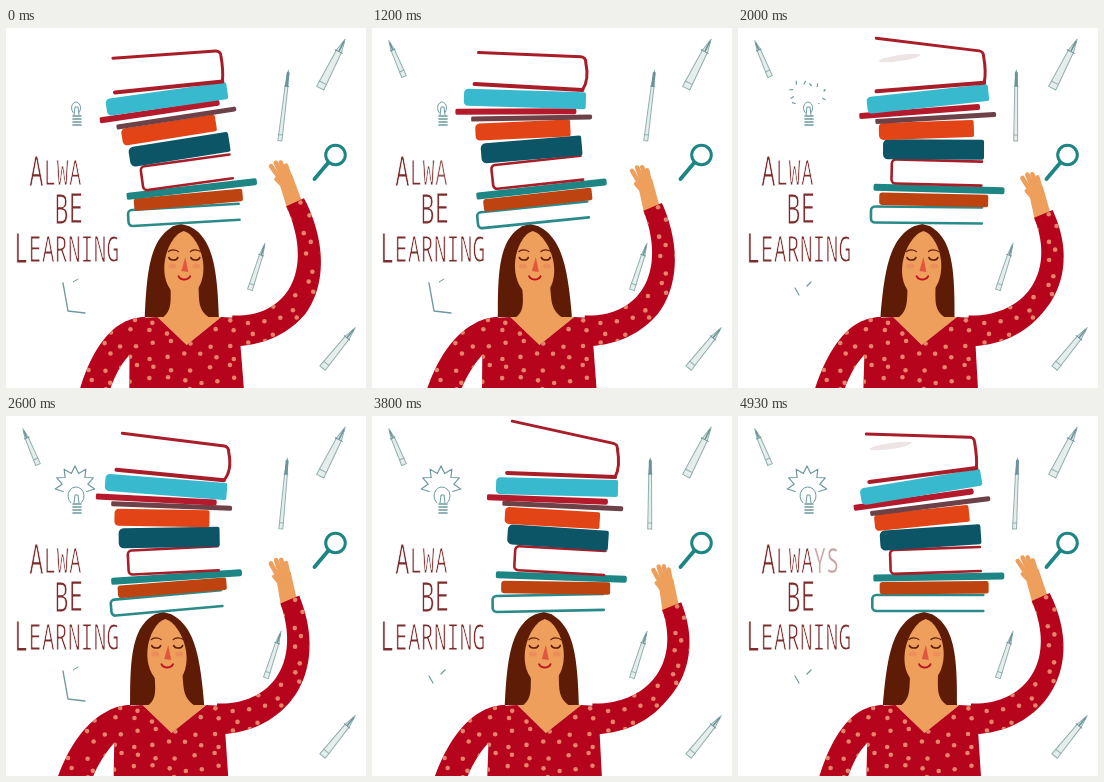
An HTML page with a canvas for the animation above (5000 ms loop, 360x360 px).

```html
<!DOCTYPE html>
<html lang="en">
<head>
<meta charset="utf-8">
<title>Always Be Learning</title>
<style>
  html, body { margin: 0; height: 100%; overflow: hidden; background: #fff; }
  canvas { display: block; width: 100vw; height: 100vh; }
</style>
</head>
<body>
<canvas id="stage" width="360" height="360"></canvas>
<script>
const ctx = document.getElementById('stage').getContext('2d');
const RED = '#b5041c', SKIN = '#ee9f5c', HAIR = '#5e1b06', TEAL = '#1d8583', WINE = '#a91d29', INK = '#6d9a9f';
const { sin, cos, sqrt, tanh, PI } = Math;
const rad = d => d * PI / 180;
const clamp = (v, a = 0, b = 1) => Math.min(b, Math.max(a, v));
let phase, C, S;   // sway phase in degrees, its cosine and sine

const wave = (amp, lag) => amp * cos(rad(phase - lag));
const near = (deg, spread) => cos(rad(phase - deg)) > cos(rad(spread));

// The sway travels upwards: higher parts lag behind the hips.
function sway(y, x = 180) {
  const lag = y < 200 ? 100 - .36 * y : 26 - .08 * (y - 200);
  const amp = clamp(19.5 - (y - 90) * .046, 10.5, 19.5);
  return wave(amp + Math.max(0, (110 - x) * .1), lag);
}
const body = (x, y) => [x + sway(y, x), y];
function arm(x, y) {
  const up = Math.max(0, 285 - y);
  return [x + wave(11 + up * .014, 20 + up * .4), y + clamp(up / 100) * (7 * S - 4 * C)];
}

function poly(color, pts) {
  ctx.beginPath();
  pts.forEach(p => ctx.lineTo(...p));
  ctx.closePath();
  ctx.fillStyle = color;
  ctx.fill();
}

function line(color, width, ...pts) {
  ctx.beginPath();
  pts.forEach(p => ctx.lineTo(...p));
  ctx.strokeStyle = color;
  ctx.lineWidth = width;
  ctx.stroke();
}

function ring(x, y, rx, ry, from = 0, to = 360) {
  ctx.beginPath();
  ctx.ellipse(x, y, rx, ry, 0, rad(from), rad(to));
}

function at(x, y, angle, draw) {
  ctx.save();
  ctx.translate(x, y);
  ctx.rotate(angle);
  draw();
  ctx.restore();
}

const bezier = (a, b, c, d) => t => [0, 1].map(k =>
  (1 - t) ** 3 * a[k] + 3 * t * (1 - t) ** 2 * b[k] + 3 * t * t * (1 - t) * c[k] + t ** 3 * d[k]);
const straight = (a, b) => t => [0, 1].map(k => a[k] + (b[k] - a[k]) * t);

// Solid of varying half width along a centre line
function tube(color, map, centre, half, steps = 40) {
  const left = [], right = [];
  for (let i = 0; i <= steps; i++) {
    const t = i / steps, [x, y] = centre(t);
    const [x0, y0] = centre(t - .001), [x1, y1] = centre(t + .001);
    const k = half(t) / Math.hypot(x1 - x0, y1 - y0);
    const nx = (y0 - y1) * k, ny = (x1 - x0) * k;
    left.push(map(x + nx, y + ny));
    right.unshift(map(x - nx, y - ny));
  }
  poly(color, [...left, ...right]);
}

// Polka dots inside the outline drawn last
function dots(map) {
  ctx.save();
  ctx.clip();
  ctx.fillStyle = '#e5836b';
  for (let j = 0; j < 16; j++)
    for (let i = 0; i < 15; i++) {
      const x = 64 + i * 18 + j % 2 * 9 + 3 * sin(i * 7 + j * 3);
      const y = 184 + j * 12 + 3 * cos(i * 5 + j * 2);
      ring(...map(x, y), 2.3, 2.3);
      ctx.fill();
    }
  ctx.restore();
}

// From the bottom up: colour, centre, width, thickness, open
const books = [
  ['#2a8a8a', 175, 111, 16, true],
  ['#bd4310', 181, 109, 12.5],
  [TEAL, 185.5, 131, 7],
  [WINE, 182, 90, 24, true],
  ['#0b5566', 177.5, 101, 20],
  ['#e24416', 169.5, 95, 17],
  ['#6c4148', 178.5, 121, 5],
  ['#b41a2b', 162.5, 121, 6],
  ['#38b9cd', 171, 122, 17],
];

// Low books rock with a quarter turn of delay against the high ones.
const tilt = y => (-5 + C * (.155 * y - 25.6) + S * 11 * sin(PI * (y - 68) / 140)) / 110;

function stack() {
  let base = 195;
  for (const [color, x, w, h, open] of books) {
    const y = base - h / 2;
    base -= h + 1;
    at(x + sway(y), y, tilt(y), () => {
      const l = -w / 2, r = w / 2, t = -h / 2, b = h / 2;
      ctx.beginPath();
      if (open) {
        ctx.moveTo(r, t);
        ctx.arcTo(l, t, l, b, 4);
        ctx.arcTo(l, b, r, b, 4);
        ctx.lineTo(r, b);
        ctx.strokeStyle = color;
        ctx.lineWidth = 2.6;
        ctx.stroke();
      } else {
        ctx.roundRect(l, t, w, h, [h / 4, 2, 2, h / 4]);
        ctx.fillStyle = color;
        ctx.fill();
      }
    });
  }
}

// The topmost book opens and shuts as it sways.
function topBook() {
  const ends = (x, y, angle) => [-54, 54].map(d => [x + d * cos(angle), y + d * sin(angle)]);
  const [coverEnd, hinge] = ends(175.5 + sway(22), 22 - 6 * S, (8 + 12 * S - 10 * C) / 108);
  const [baseEnd, foot] = ends(174 + sway(59), 59, (-2 - 13 * C) / 108);
  ctx.beginPath();
  ctx.moveTo(...coverEnd);
  ctx.arcTo(...hinge, ...foot, 5);
  ctx.quadraticCurveTo(hinge[0] + 3, foot[1] - 10, ...foot);
  ctx.strokeStyle = WINE;
  ctx.lineWidth = 3;
  ctx.stroke();
  line(WINE, 4, foot, baseEnd);
  if (near(65, 53))
    at(145 + sway(30), 30, -.15, () => {
      ring(0, 0, 21, 3);
      ctx.fillStyle = '#efe4e4';
      ctx.fill();
    });
}

function face() {
  for (const side of [-1, 1]) {
    ctx.strokeStyle = HAIR;
    ctx.lineWidth = 1.6;
    ring(side * 11, -6, 4.5, 3, 10, 170);
    ctx.stroke();
    ctx.lineWidth = 1.1;
    ring(side * 11, -10, 5.5, 3, 205, 335);
    ctx.stroke();
    ctx.fillStyle = '#ec8d5c';
    ring(side * 12, 3, 4, 2.5);
    ctx.fill();
  }
  poly('#e2553f', [[1, -6], [4, 9], [-3, 8]]);
  ctx.strokeStyle = '#bd1324';
  ctx.lineWidth = 1.8;
  ring(0, 12, 6, 4.5, 15, 165);
  ctx.stroke();
}

function woman() {
  const neckline = [[147, 289], [176, 317], [211, 289]];
  tube(HAIR, body, straight([171.5, 196], [171.5, 289]), t => 38.5 * tanh((3.1 * t) ** .6));
  tube(SKIN, body, straight([174, 250], [175, 290]), t => 14 + 10 * t ** 6);
  poly(SKIN, neckline.map(p => body(...p)));
  tube(SKIN, body, straight([173.5, 203], [173.5, 269]), t => 43 * t ** .65 * sqrt(1 - t));
  at(174 + sway(235), 235, 0, face);

  // Raised hand
  tube(SKIN, arm, straight([293, 188], [285, 156]), t => 8.5 - t);
  for (let i = 0; i < 4; i++)
    line(SKIN, 4.6, arm(272 + 5 * i, 146 - 4 * sin(i)), arm(280 + 3.5 * i, 159));
  line(SKIN, 4, arm(276, 159), arm(284, 168));

  tube(RED, arm, bezier([222, 303], [285, 303], [322, 250], [293, 182]), t => 15.5 - 5.5 * t);
  dots(arm);
  tube(RED, body, bezier([135, 304], [112, 304], [92, 330], [80, 368]), () => 15);
  dots(body);
  poly(RED, [...neckline, [228, 290], [233, 366], [118, 366], [119, 312], [130, 290]].map(p => body(...p)));
  dots(body);
}

function tool(x, y, len, width, angle, brush) {
  at(x, y, rad(angle), () => {
    const h = len / 2, w = width / 2, neck = brush ? 16 - h : len * .24 - h;
    ctx.strokeStyle = '#8fb0b0';
    ctx.lineWidth = 1;
    poly('#e6edeb', [[0, -h], [w * .7, neck], [w, h - 3], [-w, h - 3], [-w * .7, neck]]);
    ctx.stroke();
    line('#6b9399', brush ? 3 : 1.6, [0, 3 - h], [0, neck - 1]);
    line('#6b9399', 1, [-w, neck], [w, neck]);
    line('#8fb0b0', 1, [-w, h - 9], [w, h - 9]);
  });
}

function bulb() {
  const lit = !near(275, 60), dim = near(60, 25), big = lit && !dim;
  ctx.strokeStyle = INK;
  ctx.lineWidth = 1;
  ring(70, 80, big ? 8 : 4.5, big ? 9 : 6, 130, 410);
  ctx.stroke();
  line(INK, 1, [68, 87], [69, 79], [72, 79], [73, 87]);
  for (let y = 88; y < 98; y += 3) line(INK, 1.6, [67, y], [75, y]);
  if (!lit) return;
  const rays = [];
  for (let i = 0; i <= 14; i++) {
    const a = rad(155 + i * 230 / 14), r = i % 2 ? 20 : 13;
    rays.push([69 + r * cos(a), 70 + r * sin(a)]);
  }
  ctx.setLineDash(dim ? [3, 10] : []);
  line(INK, 1.2, ...rays);
  ctx.setLineDash([]);
}

function doodles() {
  if (!near(290, 45)) tool(25, 32, 42, 5, -23);
  tool(326, 37, 58, 8, 27);
  tool(332, 321, 55, 7, 39);
  tool(278, 79, 74, 4, 4 - 4 * S, true);
  tool(near(335, 35) ? 251 : 267, 240, 52, 5, 18);
  bulb();

  line(TEAL, 3.8, [322, 135], [308.5, 151]);
  ring(329.5, 127, 9.8, 9.8);
  ctx.lineWidth = 3;
  ctx.stroke();

  if (near(240, 90)) {
    line(INK, 1.4, [57, 255], [62, 283], [79, 285]);
    line(INK, 1, [67, 254], [72, 251]);
  } else {
    line(INK, 1.2, [57, 260], [61, 267]);
    line(INK, 1.2, [69, 258], [73, 254]);
  }
}

// Condensed thin lettering with a taller first capital; the white edge thins the strokes
function words(text, x, y, size, alpha = () => 1) {
  ctx.save();
  ctx.translate(x, y);
  ctx.scale(.6, 1);
  ctx.fillStyle = '#7d2c2c';
  ctx.strokeStyle = '#fff';
  ctx.lineWidth = 1.1;
  let pen = 0;
  [...text].forEach((ch, i) => {
    ctx.font = `300 ${i ? size : 41}px "Noto Sans Mono", monospace`;
    ctx.globalAlpha = alpha(i);
    ctx.fillText(ch, pen, i ? -1 : 0);
    ctx.strokeText(ch, pen, i ? -1 : 0);
    pen += ctx.measureText(ch).width;
  });
  ctx.restore();
}

function render(ms) {
  const step = Math.floor((ms % 5000 + 4) * .015) % 75;   // 15 pictures per second
  phase = 313 + step / 15 * 233;
  C = cos(rad(phase));
  S = sin(rad(phase));
  ctx.fillStyle = '#fff';
  ctx.fillRect(0, 0, 360, 360);
  ctx.lineCap = ctx.lineJoin = 'round';
  doodles();
  words('ALWAYS', 23, 158, 35, i => i > 3 ? clamp(C * 2 - 1.4, 0, .7) : i > 2 ? clamp((1 + S) * 4) : 1);
  words('BE', 48, 196, 41);
  words('LEARNING', 8, 235, 36);
  woman();
  stack();
  topBook();
}

const start = performance.now();
function tick() {
  render(performance.now() - start);
  requestAnimationFrame(tick);
}
tick();
</script>
</body>
</html>
```
